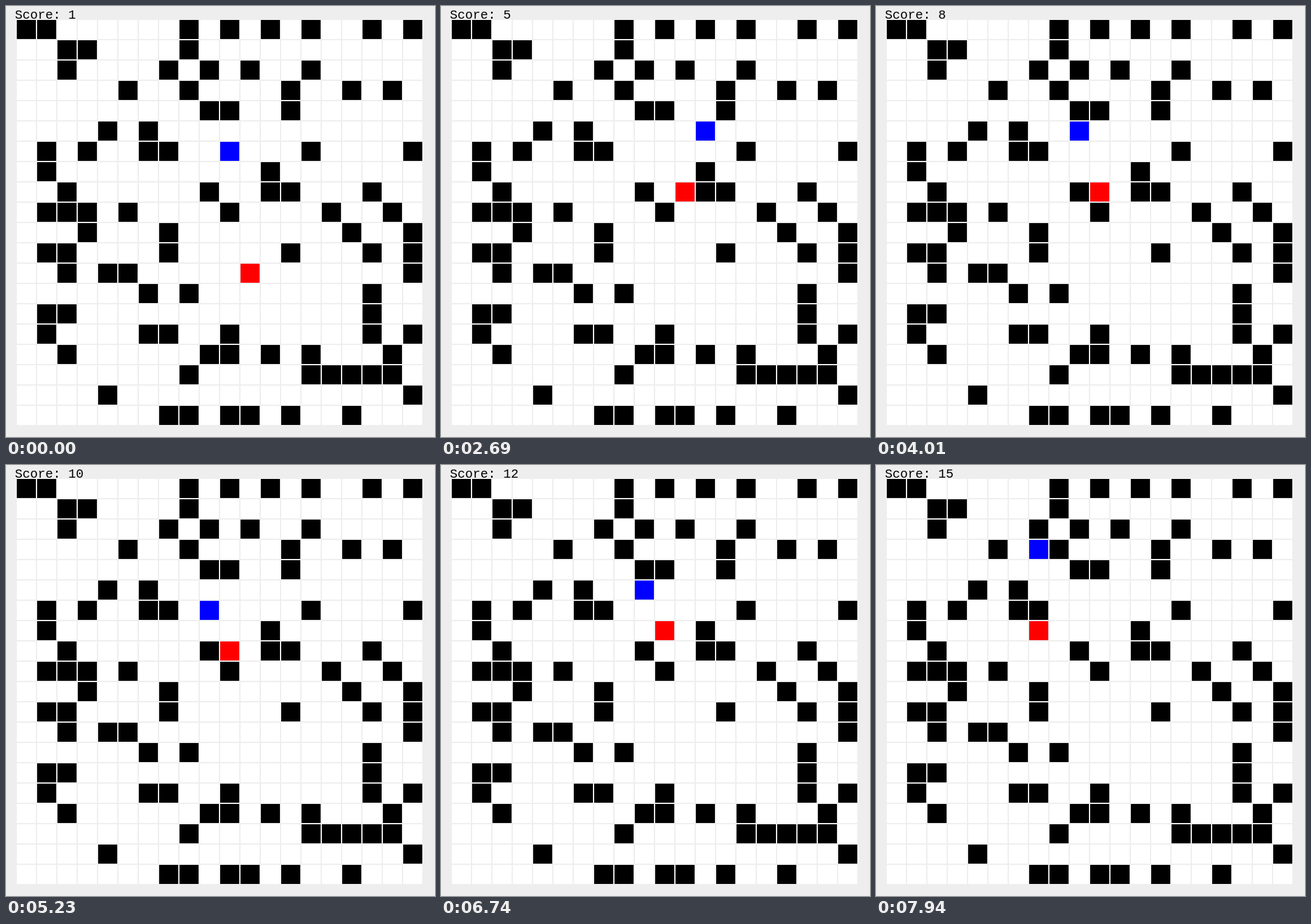
An HTML page with a canvas for the animation above (8000 ms loop, 675 by 679 pixels).

```html
<!DOCTYPE html>
<html lang="en">
<head>
<meta charset="utf-8">
<title>Grid chase</title>
<style>
  html, body { margin: 0; width: 100%; height: 100%; overflow: hidden; background: #eee; }
  canvas { display: block; }
</style>
</head>
<body>
<canvas id="stage" width="675" height="679"></canvas>
<script>
const LOOP = 8000, PITCH = 32, SIZE = 30, LEFT = 17, TOP = 22;

const board = `
##......#.#.#.#..#.#
..##....#...........
..#....#.#.#..#.....
.....#..#....#..#.#.
.........##..#......
....#.#.............
.#.#..##......#....#
.#..........#.......
..#......#..##...#..
.###.#....#....#..#.
...#...#........#..#
.##....#.....#...#.#
..#.##.............#
......#.#........#..
.##..............#..
.#....##..#......#.#
..#......##.#.#...#.
........#.....#####.
....#..............#
.......##.##.#..#...`.trim().split("\n");

const directions = { L: [-1, 0], R: [1, 0], U: [0, -1], D: [0, 1] };

// L/R/U/D move the player, T is a chaser turn that also scores a point.
const events = [
  [160, "R"], [490, "T"], [1080, "T"], [1710, "T"], [1840, "U"], [2230, "T"],
  [2690, "R"], [2850, "T"], [2880, "R"], [3440, "T"], [3510, "L"], [3680, "L"],
  [3910, "L"], [4010, "L"], [4010, "T"], [4600, "T"], [5130, "T"], [5230, "D"],
  [5730, "T"], [5790, "D"], [6060, "U"], [6160, "R"], [6290, "T"], [6350, "U"],
  [6740, "L"], [6840, "T"], [6980, "L"], [7140, "L"], [7410, "T"], [7610, "U"],
  [7810, "U"], [7940, "T"]
];

const ctx = document.getElementById("stage").getContext("2d");

function move(piece, dx, dy) {
  if (board[piece.y + dy][piece.x + dx] === "#") return;
  piece.x += dx;
  piece.y += dy;
}

// The chaser closes the horizontal gap first and waits when a wall blocks it.
function chase(chaser, player) {
  const dx = Math.sign(player.x - chaser.x);
  move(chaser, dx, dx ? 0 : Math.sign(player.y - chaser.y));
}

function stateAt(time) {
  const player = { x: 10, y: 6 }, chaser = { x: 11, y: 12 };
  let score = 1;
  for (const [start, action] of events) {
    if (start > time) break;
    if (action === "T") {
      chase(chaser, player);
      score++;
    } else {
      move(player, ...directions[action]);
    }
  }
  return { player, chaser, score };
}

function drawCell(x, y, color) {
  ctx.fillStyle = color;
  ctx.fillRect(LEFT + x * PITCH, TOP + y * PITCH, SIZE, SIZE);
}

function draw(time) {
  const { player, chaser, score } = stateAt(time);
  ctx.fillStyle = "#eee";
  ctx.fillRect(0, 0, 675, 679);
  board.forEach((row, y) => [...row].forEach((tile, x) =>
    drawCell(x, y, tile === "#" ? "#000" : "#fff")));
  drawCell(player.x, player.y, "#00f");
  drawCell(chaser.x, chaser.y, "#f00");
  ctx.fillStyle = "#000";
  ctx.font = '20px "Liberation Mono", monospace';
  ctx.fillText("Score: " + score, 14, 20);
}

const began = performance.now();
function frame() {
  draw((performance.now() - began) % LOOP);
  requestAnimationFrame(frame);
}
frame();
</script>
</body>
</html>
```
